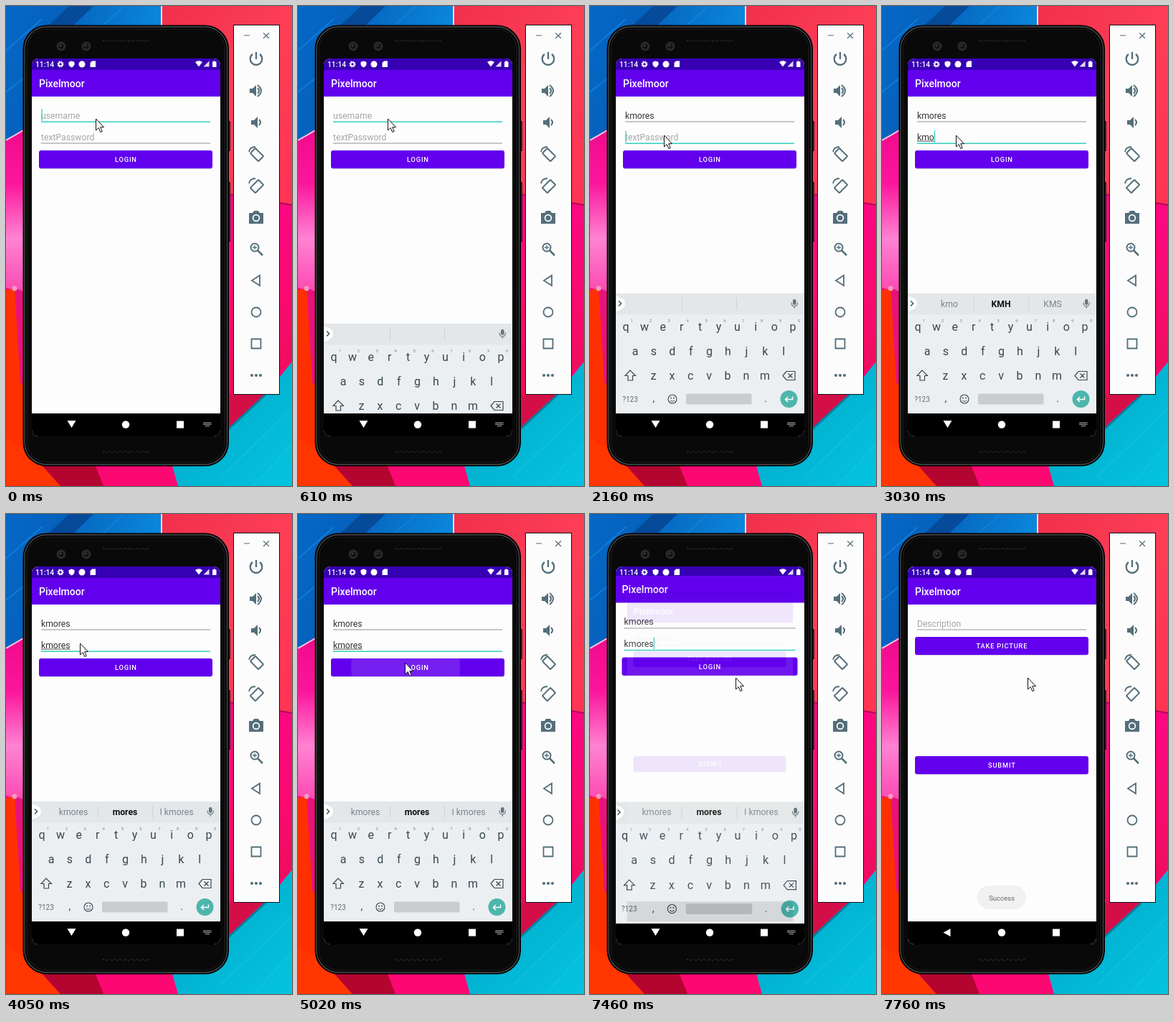
Write an HTML page that moves like this. It is 399 by 668 pixels and loops after 8 s.

```html
<!DOCTYPE html>
<html lang="en">
<head>
<meta charset="utf-8">
<title>Login demo</title>
<style>
  html, body { margin: 0; width: 100%; height: 100%; overflow: hidden; background: #000; }
  svg { display: block; width: 399px; height: 668px; font-family: Roboto, "Noto Sans", sans-serif; }
</style>
</head>
<body>
<svg id="stage" viewBox="0 0 399 668" xmlns="http://www.w3.org/2000/svg"></svg>
<script>
const LOOP = 8000;
const APP = 'Pixelmoor';
const USER = 'kmores';
const TEAL = '#35cfc0';
const PURPLE = '#6200ee';
const SLATE = '#546e7a';

// Markup helpers
const rect = (x, y, w, h, fill, extra = '') =>
  `<rect x="${x}" y="${y}" width="${w}" height="${h}" fill="${fill}" ${extra}/>`;
const circle = (x, y, r, fill, extra = '') =>
  `<circle cx="${x}" cy="${y}" r="${r}" fill="${fill}" ${extra}/>`;
const path = (d, fill, extra = '') => `<path d="${d}" fill="${fill}" ${extra}/>`;
const line = (d, color, width = 1.5, extra = '') =>
  path(d, 'none', `stroke="${color}" stroke-width="${width}" ${extra}`);
const text = (x, y, size, fill, value, extra = '') =>
  `<text x="${x}" y="${y}" font-size="${size}" fill="${fill}" ${extra}>${value}</text>`;
const middle = 'text-anchor="middle"';
const group = (x, y, body) => `<g transform="translate(${x} ${y})">${body}</g>`;
const gradient = (id, x2, y2, ...stops) =>
  `<linearGradient id="${id}" x1="0" y1="0" x2="${x2}" y2="${y2}">` +
  stops.map((c, i) => `<stop offset="${i / (stops.length - 1)}" stop-color="${c}"/>`).join('') +
  '</linearGradient>';

function wallpaper() {
  return rect(0, 0, 399, 668, '#fb0872') +
    path('M0 0H217V60L24 172L0 188Z', 'url(#blue)') +
    path('M88 0H122L60 60L24 84V60Z', '#064a9a') +
    line('M0 62L50 18M0 120L30 96M135 27L165 0', '#1184de', 1.5) +
    path('M217 0H399V276L311 262L217 40Z', 'url(#red)') +
    line('M217 0V30', '#f3d6e4', 2) +
    path('M0 188L26 170V400L0 392Z', 'url(#pink)') +
    line('M0 187L26 172', '#f7c8e6', 2) +
    path('M0 396L12 392L26 420V668H0Z', '#ff3000') +
    path('M12 392L30 400V530L20 525Z', '#e9127a') +
    circle(12, 393, 3.5, '#f59ac6') +
    path('M0 600L40 628L76 668H0Z', '#ff3600') +
    path('M40 628H120L136 668H76Z', '#b40530') +
    path('M311 262L399 277V500L311 545Z', 'url(#magenta)') +
    line('M311 262L399 277', '#b00a50', 2) +
    path('M311 541H362L311 590Z', '#d40f48') +
    path('M399 495L362 541L311 588L232 640L240 668H399Z', 'url(#teal)') +
    line('M362 541L311 588L232 640', '#0a7f9e', 3) +
    line('M399 560L300 655M399 610L345 668', '#25c6dd', 1);
}

function phoneBody() {
  let dots = '';
  for (let i = 0; i < 17; i++)
    dots += circle(136 + i * 3.9, 48 + (i % 2), .9, '#343434') + circle(136 + i * 3.9, 620 + (i % 2), .9, '#343434');
  return rect(308, 160, 5, 42, '#111', 'rx="1.5"') + rect(308, 245, 5, 83, '#111', 'rx="1.5"') +
    line('M312 162V200M312 247V326', '#4a4d50', .7) +
    rect(23.5, 26.5, 287.5, 614, '#000', 'rx="33"') +
    rect(26, 29, 282.5, 609, 'none', 'rx="31" stroke="#4c4f52" stroke-width="1.3"') +
    rect(29, 32, 276.5, 603, '#090909', 'rx="28" stroke="#242424"') +
    [77, 112].map(x => circle(x, 56, 6.5, '#2a2a2a') + circle(x, 56, 3.5, '#131313') +
      circle(x - 1, 55, 1.3, '#444')).join('') + dots;
}

function sidePanel() {
  const s = (d, w = 2) => line(d, SLATE, w);
  const speaker = 'M-9-3H-5L0-8V8L-5 3H-9Z';
  const rotate = angle =>
    rect(-8, -5, 16, 10, 'none', `rx="1" stroke="${SLATE}" stroke-width="2" transform="translate(1 1) rotate(${angle})"`) +
    s('M-10-3Q-9-10-1-10', 1.8);
  const icons = [
    s('M0-10V0M-5-7A8.3 8.3 0 1 0 5-7', 2.3),
    path(speaker, SLATE) + s('M2-4Q6 0 2 4M2-8Q12 0 2 8'),
    path(speaker, SLATE, 'transform="translate(2 0)"') + s('M4-4Q8 0 4 4'),
    rotate(45),
    rotate(-45),
    path('M-10-6H-5L-3-9H3L5-6H10V9H-10Z', SLATE) + circle(0, 1, 4.4, SLATE, 'stroke="#fff" stroke-width="1.7"'),
    circle(-2, -2, 5.5, 'none', `stroke="${SLATE}" stroke-width="2"`) + s('M2 2L9 9', 2.5) + s('M-5-2H1M-2-5V1', 1.3),
    s('M5-7V7L-6 0Z', 1.8),
    circle(0, 0, 6.5, 'none', `stroke="${SLATE}" stroke-width="1.8"`),
    s('M-6.5-6.5H6.5V6.5H-6.5Z', 1.8),
    [-6, 0, 6].map(x => circle(x, 0, 2.1, SLATE)).join('')
  ];
  return rect(317.5, 26.5, 64, 514, '#fcfcfc', 'stroke="#111"') +
    line('M332 41H340M359 37.5L367 45M367 37.5L359 45', SLATE, 1.2) +
    icons.map((icon, i) => group(349, 74 + i * 44, icon)).join('');
}

const appFrame = () =>
  rect(36, 73, 263, 526, '#fdfdfd') +
  rect(36, 73, 263, 16, '#3700b3') + rect(36, 89, 263, 37, PURPLE) +
  rect(36, 567, 263, 32, '#000') +
  text(46, 113, 14, '#fff', APP, 'font-weight="500"');

const button = (y, label) =>
  rect(46, y + 1, 242, 25, '#d5cfe0', 'rx="3"') + rect(46, y, 242, 25, PURPLE, 'rx="3"') +
  text(167.4, y + 16, 9.3, '#fff', label, `${middle} font-weight="500" letter-spacing=".8"`);

function keyboard() {
  const ink = '#37474f';
  const row = (keys, x0, y) => [...keys].map((k, i) =>
    text(x0 + i * 25.9, y, 16, ink, k, middle)).join('');
  const digits = [...'1234567890'].map((d, i) =>
    text(58.5 + i * 25.9, 440, 6, '#78858b', d, middle)).join('');
  return rect(36, 400, 263, 167, '#eceff1') + rect(36, 400, 263, 29.5, '#e3e7e9') +
    path('M36 404A10.5 10.5 0 0 1 36 425Z', '#fff') + circle(41, 414, 8, '#fff') +
    line('M40 410.5L43.5 414L40 417.5', ink, 1.4) +
    line('M128.5 406V423M204.5 406V423', '#cdd3d6', 1) +
    rect(283, 408, 4.5, 8, '#66757d', 'rx="2.2"') +
    line('M281 412.5Q281 418 285.2 418T289.5 412.5M285.2 418V421', '#66757d', 1.1) +
    row('qwertyuiop', 50, 451.5) + digits + row('asdfghjkl', 63, 485.5) + row('zxcvbnm', 88.5, 519.5) +
    line('M56 507L49 514.5H53V521H59.5V514.5H63.5Z', ink, 1.2) +
    line('M269 514.5L274 508.5H286V520.5H274ZM276.5 511.5L282.5 517.5M282.5 511.5L276.5 517.5', ink, 1.2) +
    text(56, 550.5, 10, '#5c6b73', '?123', middle) +
    text(89, 551, 14, ink, ',', middle) + text(245, 551, 14, ink, '.', middle) +
    circle(115, 547, 6, 'none', `stroke="${ink}" stroke-width="1.1"`) +
    circle(113, 545.5, .9, ink) + circle(117, 545.5, .9, ink) + line('M112 548.5Q115 552 118 548.5', ink, 1) +
    rect(134, 539.5, 91.5, 15, '#c9cdd0', 'rx="2"') +
    circle(277.5, 547, 12, '#4db6ac') +
    line('M282.5 543.5V547.5H273M276 544L272.5 547.5L276 551', '#fff', 1.5);
}

function statusBar() {
  return text(41, 84.5, 10.3, '#fff', '11:14', 'font-weight="500"') +
    circle(76, 81, 2.6, 'none', 'stroke="#fff" stroke-width="1.8"') +
    circle(76, 81, 4, 'none', 'stroke="#fff" stroke-width="1.2" stroke-dasharray="1.6 1.54"') +
    path('M91.5 76.5L95.5 78V81Q95 84 91.5 85.5Q88 84 87.5 81V78Z', '#fff') +
    circle(106, 81, 4.5, '#fff') +
    `<g id="sd">${path('M117.5 79L120 76.5H125V85H117.5Z', '#fff')}</g>` +
    `<g id="dot">${circle(135.5, 81, 1.7, '#fff')}</g>` +
    path('M264 78Q269 74.5 274 78L269 84.5Z', '#fff') +
    path('M283.5 76.5V84.5H275.5Z', '#fff', 'fill-opacity=".85"') +
    path('M288 77.5H289.5V76.5H292V77.5H293.5V85H288Z', '#fff');
}

function navIcons() {
  return `<g id="navDown">${path('M85.5 577H97.5L91.5 587Z', '#fff')}${
      line('M275.5 580H286.5M275.5 582.3H286.5M278 584.6H284', '#aaa', 1.5, 'stroke-dasharray="1.5 .6"')}</g>` +
    `<g id="navBack">${path('M95.5 577V588L85.5 582.5Z', '#fff')}</g>` +
    circle(167, 582.5, 5.2, '#fff') + rect(238, 577.5, 10, 10, '#fff');
}

const stage = document.getElementById('stage');
stage.innerHTML = '<defs>' +
  gradient('blue', 1, .3, '#0668c6', '#0562bd', '#0876cc', '#0a8be0') +
  gradient('red', 1, 1, '#f0304c', '#fd3e56', '#ff3454') +
  gradient('pink', 0, 1, '#f00a8c', '#fb169c', '#ff83d3', '#fb48b0') +
  gradient('magenta', 0, 1, '#fb0884', '#f80c70', '#ec0e58') +
  gradient('teal', 1, 1, '#05a3c2', '#02b4d2', '#04c4e0') +
  '<clipPath id="screen"><rect x="36" y="73" width="263" height="526" rx="9"/></clipPath>' +
  '<clipPath id="content"><rect x="36" y="73" width="263" height="494"/></clipPath>' +
  '<clipPath id="loginArea"><rect x="46" y="201" width="242" height="25" rx="3"/></clipPath></defs>' +
  wallpaper() + phoneBody() + sidePanel() +
  `<g clip-path="url(#screen)"><g id="loginPage">${appFrame()}
    <g id="fields"></g>${button(201, 'LOGIN')}
    <g clip-path="url(#loginArea)">${circle(150, 213, 0, '#fff', 'id="ripple"')}</g>
    <g clip-path="url(#content)"><g id="keys">${keyboard()}<g id="hints"></g></g></g></g>
    <g id="postPage">${appFrame()}${text(49, 156.5, 12.1, '#a6a6a6', 'Description')}${
      rect(49, 160.5, 236, 1, '#999')}${button(171, 'TAKE PICTURE')}${button(337, 'SUBMIT')}</g>
    <g id="toast">${rect(133, 517, 68, 33, '#f1f1f1', 'rx="16.5"')}${
      text(167, 537.5, 9.5, '#666', 'Success', middle)}</g>
    ${statusBar()}${navIcons()}</g>` +
  `<g id="mouse">${path('M0 0V16L3.7 12.5L6.3 18.5L8.7 17.5L6.2 11.7H11Z', '#fff', 'stroke="#111"')}</g>`;

const el = Object.fromEntries([...stage.querySelectorAll('g[id], circle[id]')].map(n => [n.id, n]));
const show = (node, on) => node.setAttribute('display', on ? 'inline' : 'none');

const track = (...steps) => t => steps.reduce((v, s) => t >= s[0] ? s[1] : v, steps[0][1]);
const userLength = track([0, 0], [1170, 2], [1320, 4], [1470, 6]);
const passLength = track([0, 0], [2740, 1], [2880, 2], [3030, 3], [3180, 4], [3320, 5], [3460, 6]);
const caretOn = track([0, 1], [310, 0], [870, 1], [1470, 0], [1890, 1], [2600, 0], [2740, 1],
  [4050, 0], [4480, 1], [4890, 0], [6440, 1], [7020, 0], [7460, 1]);
const keyDrop = track([0, 168], [450, 105], [590, 42], [730, 10], [870, 0]);
const mousePos = track([0, [125.5, 157]], [1750, [122, 162]], [1890, [109, 175]], [2020, [103.5, 180]],
  [4340, [110, 185]], [4480, [128, 197]], [4620, [143, 205]], [4750, [149.5, 207]],
  [5300, [160, 211]], [5430, [184, 220]], [5570, [198, 226]], [5700, [203.5, 228]]);
const ripple = track([0, [0, 0]], [4890, [36, .1]], [5020, [76, .12]], [5170, [150, .12]],
  [5300, [150, .06]], [5430, [0, 0]]);
const pages = track([0, [1, .88, 0]], [7460, [1.012, .88, .09]], [7610, [1.1, .985, 1]], [7760, [1, 1, 1]]);

const HINTS = [[], ['k', 'know', 'keep'], ['km', 'KM', 'kms'], ['kmo', 'KMH', 'KMS'],
  ['kmor', 'more', 'mor'], ['kmore', 'more', 'mores'], [USER, 'mores', 'I ' + USER]];

function field(baseline, length, placeholder, focused, caret, composing) {
  const value = USER.slice(0, length);
  const label = value ? text(49, baseline, 12.2, '#333', value, focused ? 'class="typed"' : '')
    : text(49, baseline, 12.2, '#a6a6a6', placeholder);
  return label + rect(49, baseline + 4, 236, focused ? 1.5 : 1, focused ? TEAL : '#929292') +
    (focused && value && composing ? rect(49, baseline + 1.2, 0, .8, '#333', 'class="compose"') : '') +
    (focused && caret ? rect(49.3, baseline - 13, 1.3, 16.5, TEAL, 'class="caret"') : '');
}

function fitToTyped() {
  const [typed, compose, caret] = ['.typed', '.compose', '.caret'].map(c => el.fields.querySelector(c));
  if (!typed) return;
  const width = typed.getComputedTextLength();
  compose?.setAttribute('width', width);
  caret?.setAttribute('x', 49 + width);
}

function render(t) {
  const onPassword = t >= 2160;
  const leaving = t >= 7460;
  const userCount = userLength(t), passCount = passLength(t), caret = caretOn(t);
  el.fields.innerHTML = field(156.5, userCount, 'username', !onPassword, caret, true) +
    field(186.5, passCount, 'textPassword', onPassword, caret, !leaving);
  fitToTyped();

  const count = onPassword ? passCount : userCount;
  const partial = t >= 1470 && t < 1600;
  el.hints.innerHTML = HINTS[count].slice(0, partial ? 2 : 3).map((word, i) =>
    text(94 + i * 72, 418.5, 12.2, i === 1 ? '#111' : '#78858b', word,
      `${middle} font-weight="${i === 1 ? 700 : 400}"`)).join('');
  el.keys.setAttribute('transform', `translate(0 ${keyDrop(t)})`);

  const [radius, alpha] = ripple(t);
  el.ripple.setAttribute('r', radius);
  el.ripple.setAttribute('fill-opacity', alpha);

  const [exitScale, enterScale, enterAlpha] = pages(t);
  const zoom = s => `translate(167.5 336) scale(${s}) translate(-167.5 -336)`;
  el.loginPage.setAttribute('transform', zoom(exitScale));
  el.postPage.setAttribute('transform', zoom(enterScale));
  el.postPage.setAttribute('opacity', enterAlpha);

  const done = t >= 7760;
  const syncing = t >= 1320 && t < 2020;
  show(el.toast, done);
  show(el.navBack, done);
  show(el.navDown, !done);
  show(el.sd, !syncing);
  show(el.dot, syncing);
  el.mouse.setAttribute('transform', `translate(${mousePos(t)})`);
}

const start = performance.now();
function tick() {
  render((performance.now() - start) % LOOP);
  requestAnimationFrame(tick);
}
tick();
</script>
</body>
</html>
```
